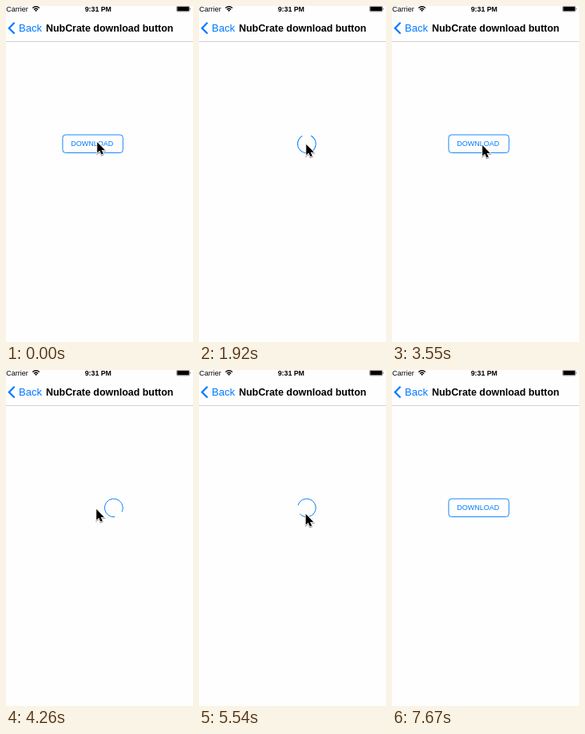
An HTML page that plays this animation: 234 px wide and 420 px high, repeating every 8.01 s.

```html
<!DOCTYPE html>
<html lang="en">
<head>
<meta charset="utf-8">
<title>Download button</title>
<style>
  html, body { margin: 0; width: 100%; height: 100%; overflow: hidden; background: #fefefe; }
  svg { display: block; width: 234px; height: 420px; font-family: "Liberation Sans", Arial, sans-serif; }
  .bold { font-weight: bold; }
  .line { fill: none; stroke: #007aff; stroke-width: 0.9; }
  .blue { fill: #007aff; }
  #pointer { filter: drop-shadow(0.5px 1.2px 0.7px #0007); }
</style>
</head>
<body>
<svg viewBox="0 0 234 420">
  <!-- status bar -->
  <text x="0.3" y="7" font-size="9">Carrier</text>
  <g fill="none" stroke="#000" stroke-width="1.3">
    <path d="M33.2 2.6Q37.5 -1.4 41.8 2.6M34.9 4.5Q37.5 2.1 40.1 4.5"/>
    <path d="M36 5.4Q37.5 4.3 39 5.4L37.5 7Z" fill="#000" stroke="none"/>
  </g>
  <text x="98.7" y="7" font-size="8.8" class="bold">9:31 PM</text>
  <rect x="213.6" y="0.3" width="16" height="6.6" rx="1.2" fill="none" stroke="#000" stroke-width="0.4"/>
  <rect x="214.3" y="0.9" width="14.6" height="5.4" rx="0.6"/>
  <path d="M230.4 2.4Q231.8 3.6 230.4 4.8Z"/>

  <!-- navigation bar -->
  <path class="line" d="M10.6 20.8L3.8 27.7 10.6 34.6" style="stroke-width: 2.2"/>
  <text x="16" y="32" font-size="13" class="blue">Back</text>
  <text x="50" y="32" font-size="12.43" class="bold">NubCrate download button</text>
  <path d="M0 44.5H234" stroke="#c4c4c4" stroke-width="0.8"/>

  <!-- button, spinner, pointer -->
  <rect id="box" class="line" y="161" height="22.5"/>
  <text id="label" x="81.3" y="175.2" font-size="9" class="blue">DOWNLOAD</text>
  <circle id="ring" class="line" cx="134.8" cy="172.3" r="11.4" pathLength="360" stroke-dasharray="303 57"/>
  <path id="pointer" d="M0 0V13.4L3 10.6 5.2 15.4 7.6 14.4 5.4 9.8H9.6Z"
    stroke="#fff" stroke-width="1.6" paint-order="stroke"/>
</svg>
<script>
const LOOP = 8010;
const RIGHT = 146.3, WIDE = 75.4, ROUND = 22.8;
const $ = id => document.getElementById(id);
const box = $('box'), label = $('label'), ring = $('ring'), pointer = $('pointer');

function draw(t) {
  const part = (start, time) => Math.min(1, Math.max(0, (t - start) / time));
  const glide = (start, time) => {
    const k = part(start, time);
    return k * k * (3 - 2 * k);
  };
  // quick way out, slower way back
  const detour = (start, time) => Math.sin(Math.PI * Math.sqrt(part(start, time)));

  // the button shrinks to a ring after each click and grows back later
  const pulse = (click, reset) => glide(click, 245) - glide(reset, 285);
  const round = pulse(635, 2565) + pulse(3895, 6205);
  const width = WIDE + (ROUND - WIDE) * round;
  box.setAttribute('x', RIGHT - width);
  box.setAttribute('width', width);
  box.setAttribute('rx', 3.6 + 7.6 * round);

  box.style.display = round === 1 ? 'none' : '';
  ring.style.display = round === 1 ? '' : 'none';
  label.style.display = round === 0 ? '' : 'none';
  ring.setAttribute('transform', `rotate(${0.3695 * t - 51.7} 134.8 172.3)`);

  const swing = detour(880, 900), back = glide(3330, 220), click = glide(4420, 250);
  const leave = glide(7100, 540);
  const x = 114.2 + 20 * glide(620, 260) + 34 * swing - 21 * back + 20.4 * click
    + 51 * leave - 22 * detour(7100, 540);
  const y = 170.2 + 2.7 * glide(1400, 500) + 30 * swing + 1.2 * back + 6 * click
    + 246 * leave;
  pointer.setAttribute('transform', `translate(${x} ${y})`);
}

const start = performance.now();
function frame() {
  draw((performance.now() - start) % LOOP);
  requestAnimationFrame(frame);
}
frame();
</script>
</body>
</html>
```
